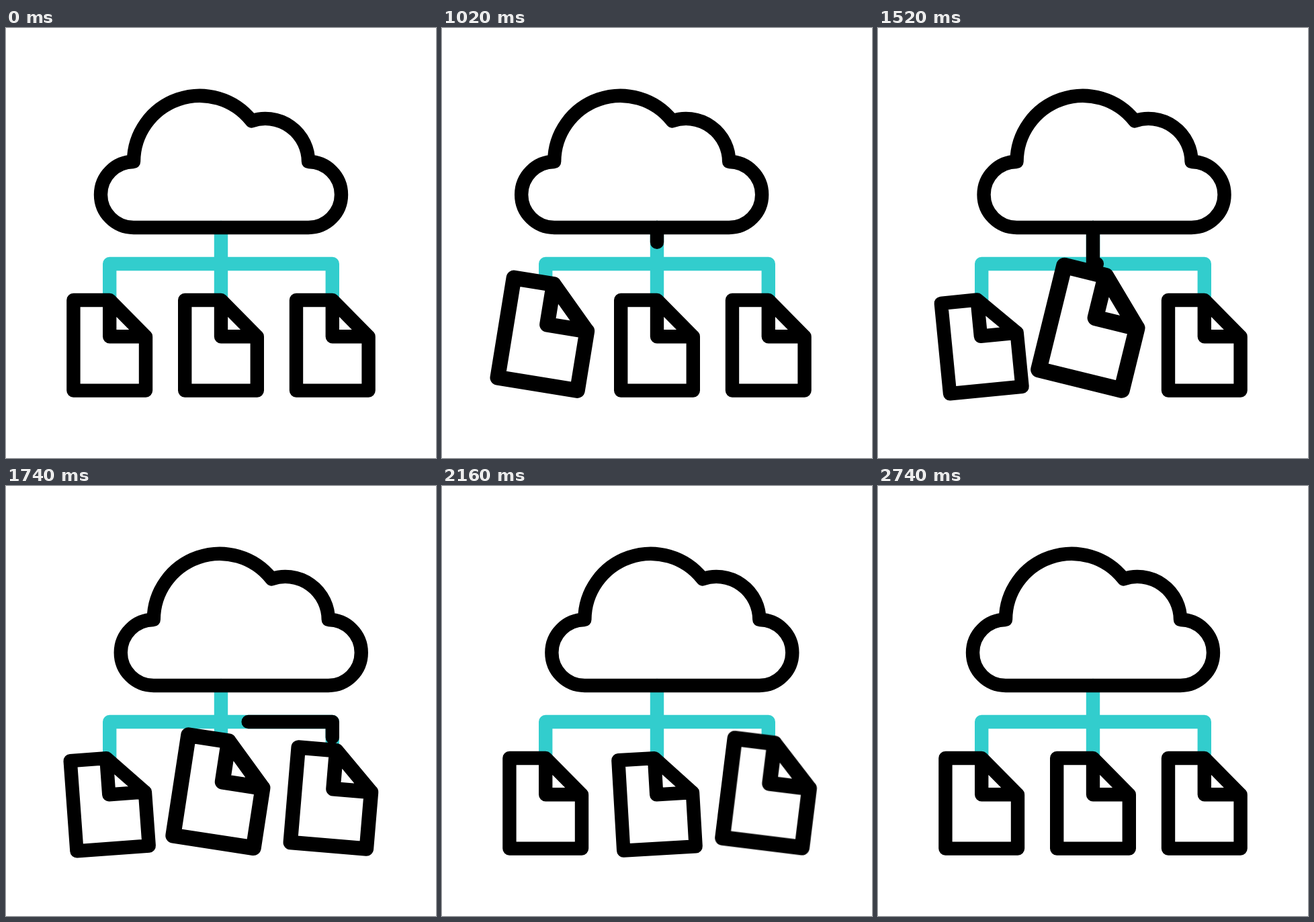
An HTML page for the animation above (3 s loop, 640 by 640 pixels).

```html
<!DOCTYPE html>
<html lang="en">
<head>
<meta charset="utf-8">
<title>Cloud file sharing</title>
<style>
  @property --head { syntax: "<length>"; inherits: false; initial-value: 0px; }
  @property --tail { syntax: "<length>"; inherits: false; initial-value: 0px; }

  html, body { margin: 0; width: 100%; height: 100%; overflow: hidden; background: #fff; }
  svg { display: block; width: 100%; height: 100%; }

  svg {
    --ease: cubic-bezier(.3333, 0, .6667, 1);
    fill: none;
    stroke: #000;
    stroke-width: 20.4;
    stroke-linecap: round;
    stroke-linejoin: round;
  }
  .wire { stroke: #32cdcd; }

  .cloud { animation: sway 3s var(--ease) infinite; }

  .pulse {
    opacity: 0;
    stroke-dasharray: calc(var(--head) - var(--tail)) 300px;
    stroke-dashoffset: calc(0px - var(--tail));
    animation: head 3s var(--ease) var(--start) infinite,
               tail 3s var(--ease) var(--start) infinite,
               show 3s step-end var(--start) infinite;
  }

  /* The sheet grows while its line weight stays the same. */
  .file {
    fill: #fff;
    vector-effect: non-scaling-stroke;
    animation: lift 3s var(--ease) var(--start) infinite,
               tilt 3s var(--ease) var(--start) infinite;
  }

  @keyframes sway {
    0%, 7.333% { translate: 0px 0px; }
    29.5% { translate: -26px 0px; }
    61.333% { translate: 31.5px 0px; }
    91.333%, 100% { translate: 0px 0px; }
  }
  @keyframes head {
    0% { --head: 0px; }
    15%, 100% { --head: 100px; }
  }
  @keyframes tail {
    0%, 5.933% { --tail: 0px; }
    20.933%, 100% { --tail: 100px; }
  }
  @keyframes show {
    0% { opacity: 1; }
    20.9%, 100% { opacity: 0; }
  }
  @keyframes lift {
    0%, 27% { translate: 0px 0px; scale: 1; }
    39.667% { translate: 0px -28.5px; scale: 1.2; }
    51.667%, 100% { translate: 0px 0px; scale: 1; }
  }
  @keyframes tilt {
    0%, 26.333% { rotate: 0deg; }
    39.667%, 40.167% { rotate: 15deg; }
    53.333% { rotate: -8deg; }
    63%, 100% { rotate: 0deg; }
  }
</style>
</head>
<body>
<svg viewBox="0 0 640 640">
  <defs>
    <path id="sheet" d="M-53.8 -67.3H0L53.8 -12.8V67.3H-53.8ZM0 -67.3V-13H53.8"/>
  </defs>

  <path class="wire" d="M320 297V405M154.2 405V351H485.8V405"/>

  <path class="pulse" style="--start:362ms" pathLength="100" d="M320 297V351H154.2V405"/>
  <path class="pulse" style="--start:891ms" pathLength="100" d="M320 297V405"/>
  <path class="pulse" style="--start:1385ms" pathLength="100" d="M320 297V351H485.8V405"/>

  <path class="cloud" d="M190 199A98.3 98.3 0 0 1 365.5 138.3A64 64 0 0 1 450 199A49 49 0 0 1 450 297H190A49 49 0 0 1 190 199Z"/>

  <g transform="translate(154.2 472.3)"><use class="file" style="--start:0ms" href="#sheet"/></g>
  <g transform="translate(320 472.3)"><use class="file" style="--start:400ms" href="#sheet"/></g>
  <g transform="translate(485.8 472.3)"><use class="file" style="--start:800ms" href="#sheet"/></g>
</svg>
</body>
</html>
```
